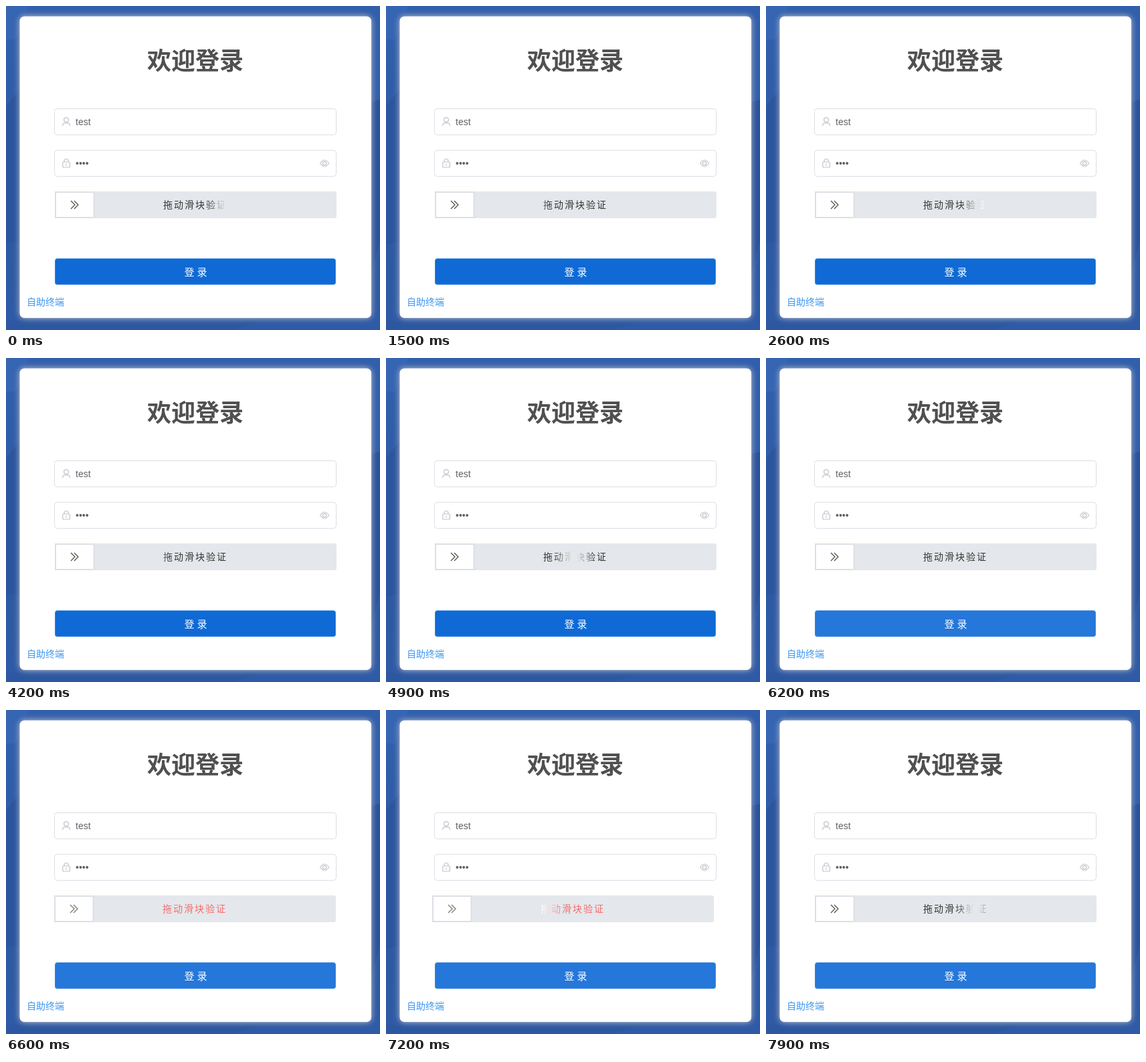
An HTML page that plays this animation: 559 by 484 pixels, repeating every 8000 ms.

```html
<!DOCTYPE html>
<html lang="zh">
<head>
<meta charset="utf-8">
<title>登录</title>
<style>
html, body { margin: 0; width: 100%; height: 100%; overflow: hidden; background: #2f5ba6; }
svg { display: block; }
text { font-family: "Liberation Sans", "Noto Sans CJK SC", "Noto Sans CJK", sans-serif; font-size: 14px; }
.card { fill: #fff; filter: drop-shadow(0 0 5px #cac6c6); }
.title { font: bold 36px "Noto Sans CJK SC", "Noto Sans CJK", sans-serif; fill: #505050; }
.field { fill: #fff; stroke: #dcdfe6; }
.value { fill: #606266; }
.icon { fill: none; stroke: #c0c4cc; stroke-width: 1.2; }
.hint { letter-spacing: 2px; fill: url(#shine); }
</style>
</head>
<body>
<svg width="559" height="484" viewBox="0 0 559 484">
  <defs>
    <linearGradient id="sky" x2="0" y2="1">
      <stop stop-color="#3160ad"/>
      <stop offset=".65" stop-color="#2d58a2"/>
      <stop offset="1" stop-color="#2f5ba6"/>
    </linearGradient>
    <linearGradient id="shine" gradientUnits="userSpaceOnUse" x1="-32" x2="32" y1="0" y2="0">
      <stop class="ink" stop-color="#333"/>
      <stop offset=".5" stop-color="#fff"/>
      <stop class="ink" offset="1" stop-color="#333"/>
    </linearGradient>
  </defs>

  <rect width="559" height="484" fill="url(#sky)"/>
  <path d="M0 0H34L14 50H0Z" fill="#3565b3"/>
  <path d="M0 150L20 125V352L0 356Z" fill="#2b559e"/>
  <path d="M470 0H559V140L546 143V10Z" fill="#315fac"/>
  <path d="M546 143L559 140V350L546 400Z" fill="#29529b"/>
  <path d="M0 470H380L340 484H0Z" fill="#2d58a1"/>

  <rect class="card" x="20.5" y="15.5" width="525.5" height="450.5" rx="7"/>
  <text class="title" x="283" y="95" text-anchor="middle">欢迎登录</text>

  <rect class="field" x="72.5" y="153.5" width="421" height="39" rx="4"/>
  <g class="icon">
    <circle cx="90" cy="170" r="3.4"/>
    <path d="M84.6 179.3V178.2Q84.8 174.8 88 174.8H92Q95.2 174.8 95.4 178.2V179.3"/>
  </g>
  <text class="value" x="104" y="178">test</text>

  <rect class="field" x="72.5" y="215.5" width="421" height="39" rx="4"/>
  <g class="icon">
    <rect x="84.8" y="233" width="10.6" height="8" rx="1"/>
    <path d="M87 233V231.5A3 3 0 0 1 93 231.5V233M90 235.5V238.5"/>
    <path d="M469.5 235Q476 225.500 482.500 235Q476 244.500 469.500 235Z"/>
    <circle cx="476" cy="235" r="2.7"/>
  </g>
  <text class="value" x="104" y="240">••••</text>

  <g id="slider">
    <rect x="73" y="277" width="421" height="40" rx="3" fill="#e4e7eb"/>
    <rect x="74" y="278" width="57.500" height="38" fill="#fff" stroke="#dcdfe6" stroke-width="2"/>
    <path id="arrows" d="M97 291L103 297L97 303M102 291L108 297L102 303" fill="none"/>
    <text class="hint" x="235" y="302">拖动滑块验证</text>
  </g>

  <rect id="button" x="73.500" y="377.500" width="419" height="38.500" rx="3" stroke="#3d86e0"/>
  <text x="283.500" y="402.500" text-anchor="middle" fill="#fff" style="font-size:15px">登 录</text>
  <text x="31" y="447" fill="#3d97f5">自助终端</text>
</svg>
<script>
const LOOP = 8000, STEP = 100;
const SHINE = { start: 800, period: 2700, from: 188, to: 364 };
const SHAKE = { start: 6500, length: 1000, offsets: [0, -1, 2, -4, 4, -4, 4, -4, 2, -1, 0] };
const HOVER_AT = 5900, ERROR_FROM = 6400, ERROR_TO = 7500;

const get = id => document.getElementById(id);
const shine = get("shine"), slider = get("slider"), arrows = get("arrows"), button = get("button");
const inks = document.querySelectorAll(".ink");

// cubic-bezier(.42, 0, .58, 1), solved by bisection
function easeInOut(x) {
  let low = 0, high = 1, u = 0.5;
  for (let i = 0; i < 20; i++) {
    u = (low + high) / 2;
    const bx = 3 * (1 - u) * u * (0.42 * (1 - u) + 0.58 * u) + u ** 3;
    if (bx < x) low = u; else high = u;
  }
  return u * u * (3 - 2 * u);
}

function shakeOffset(time) {
  const p = (time - SHAKE.start) / SHAKE.length;
  if (p <= 0 || p >= 1) return 0;
  const i = Math.floor(p * 10 + 1e-6), f = p * 10 - i;
  return SHAKE.offsets[i] * (1 - f) + SHAKE.offsets[i + 1] * f;
}

function draw(time) {
  const phase = (time - SHINE.start + SHINE.period) % SHINE.period / SHINE.period;
  const center = SHINE.from + (SHINE.to - SHINE.from) * easeInOut(phase);
  const failed = time >= ERROR_FROM && time < ERROR_TO;

  shine.setAttribute("gradientTransform", `translate(${center})`);
  inks.forEach(stop => stop.setAttribute("stop-color", failed ? "#f56c6c" : "#333"));
  slider.setAttribute("transform", `translate(${shakeOffset(time)})`);
  arrows.setAttribute("stroke", failed ? "#888" : "#444");
  arrows.setAttribute("stroke-width", failed ? 1.5 : 1.1);
  button.setAttribute("fill", time >= HOVER_AT ? "#2577da" : "#0f6ad6");
}

const origin = performance.now();
function tick() {
  const time = (performance.now() - origin) % LOOP;
  draw(Math.floor(time / STEP) * STEP);
  requestAnimationFrame(tick);
}
tick();
</script>
</body>
</html>
```
